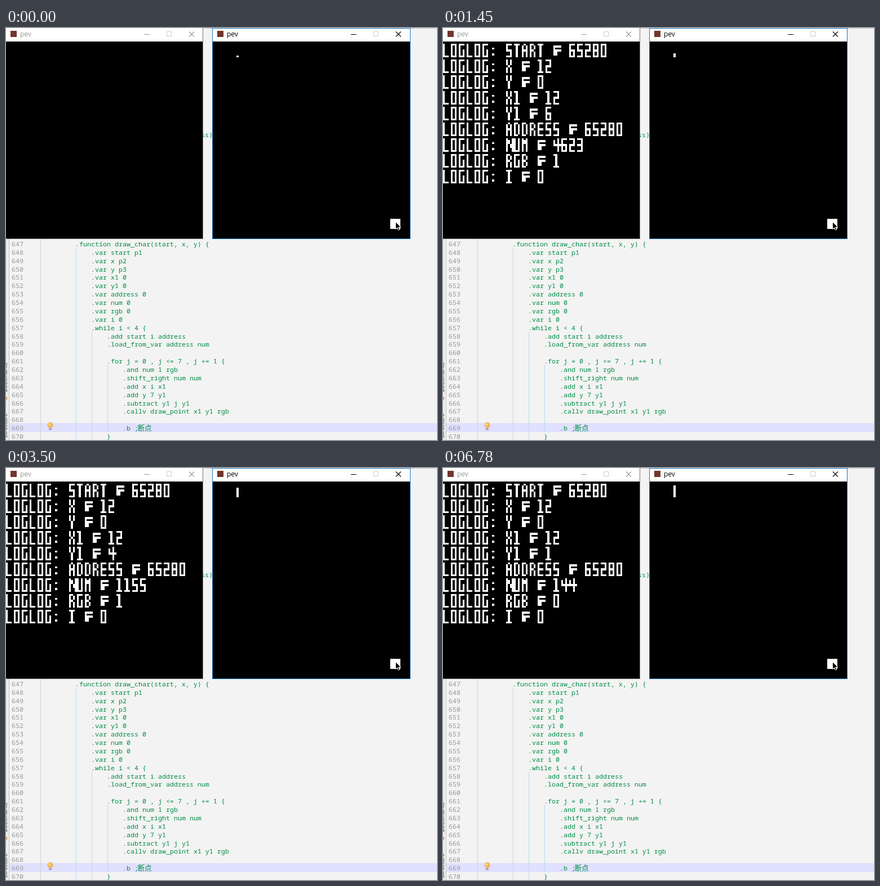
These frames come from a looping animation (765 by 732 pixels, 8000 ms). An HTML page with a canvas:

```html
<!DOCTYPE html>
<html lang="en">
<head>
<meta charset="utf-8">
<title>Debugger stepping through draw_char</title>
<style>
  html, body { margin: 0; width: 100%; height: 100%; overflow: hidden; background: #f3f3f3; }
  svg, canvas { position: absolute; left: 0; top: 0; display: block; }
  canvas { top: 24px; }
  .code text { font: 11.667px "Noto Sans Mono", "DejaVu Sans Mono", monospace; fill: #008c46; white-space: pre; }
  .code .number { fill: #999; }
  .code .cjk { font: 12.6px "Noto Sans CJK SC", "Noto Sans CJK", sans-serif; }
  .title { font: 12px "Open Sans", "Noto Sans", sans-serif; }
  .side { font: 10px "Open Sans", sans-serif; fill: #333; }
  .crisp { shape-rendering: crispEdges; }
</style>
</head>
<body>
<svg width="765" height="732" viewBox="0 0 765 732">
  <defs>
    <g id="buttons" fill="none">
      <path class="crisp" d="M245 11.5h10" stroke="currentColor"/>
      <path class="crisp" d="M285.5 6.5h8v8h-8z" stroke="#ccc"/>
      <path d="M325 6.5l9 9m0-9l-9 9" stroke="currentColor" stroke-width="1.1"/>
    </g>
  </defs>

  <rect width="765" height="732" fill="#f3f3f3"/>
  <rect width="765" height="1" fill="#c8c8c8"/>
  <g class="crisp">
    <rect y="375" width="5" height="357" fill="#ececec"/>
    <rect x="5" y="375" width="1" height="357" fill="#c4c4c4"/>
    <rect x="6" y="702" width="759" height="16" fill="#e0e0ff"/>
    <rect x="61" y="375" width="1" height="357" fill="#d4d4d4"/>
    <g fill="#bcd9ee">
      <rect x="124" y="391" width="1" height="341"/>
      <rect x="152" y="540" width="1" height="192"/>
      <rect x="180" y="599" width="1" height="119"/>
    </g>
  </g>
  <g class="side">
    <text transform="translate(2 647) rotate(-90)">Bookmarks</text>
    <text transform="translate(2 728) rotate(-90)">Structure</text>
  </g>
  <path d="M0 654l3 4-3 4z" fill="#e8a04a"/>
  <g class="code" id="code"></g>

  <circle cx="78.5" cy="705.5" r="5" fill="#f2b04a"/>
  <circle cx="77.5" cy="704.5" r="2.5" fill="#fad58c"/>
  <path class="crisp" d="M76 711.5h5m-5 2h5" stroke="#777"/>

  <g color="#999">
    <rect width="350" height="24" fill="#fff"/>
    <rect class="crisp" y="24" width="350" height="351" fill="#000"/>
    <path class="crisp" d="M349.5 0v374.5H0" fill="none" stroke="#777"/>
    <rect x="8" y="5" width="11" height="11" fill="#70362a"/>
    <text class="title" x="25" y="15" fill="#999">pev</text>
    <use href="#buttons"/>
  </g>

  <g color="#000">
    <rect x="366" width="352" height="24" fill="#fff"/>
    <rect class="crisp" x="366" y="24" width="352" height="351" fill="#000"/>
    <path class="crisp" d="M366.5 0v374.5h351V0M366 .5h352" fill="none" stroke="#1878c8"/>
    <rect x="375" y="5" width="11" height="11" fill="#70362a"/>
    <text class="title" x="392" y="15">pev</text>
    <use href="#buttons" x="367"/>
    <rect class="crisp" id="column" x="409" width="4" fill="#fff"/>
    <rect class="crisp" x="682" y="339" width="18" height="18" fill="#fff"/>
    <path d="M691.5 344.5v13l3-2.8 2 4.6 2.2-1-2-4.4h4.3z" fill="#000" stroke="#fff" stroke-width=".9"/>
  </g>
</svg>
<canvas id="screen" width="349" height="350"></canvas>

<script>
const CELL = 3.5, LOOP = 8000, COLUMN_BITS = 18495;
const LOG_TIMES = [120, 1450, 2810, 3500, 4780, 5430, 6780];
const POINT_TIMES = [0, 270, 1480, 2510, 3500, 4440];

const LINES = `0.function draw_char(start, x, y) {
1.var start p1
1.var x p2
1.var y p3
1.var x1 0
1.var y1 0
1.var address 0
1.var num 0
1.var rgb 0
1.var i 0
1.while i < 4 {
2.add start i address
2.load_from_var address num
0
2.for j = 0 , j <= 7 , j += 1 {
3.and num 1 rgb
3.shift_right num num
3.add x i x1
3.add y 7 y1
3.subtract y1 j y1
3.callv draw_point x1 y1 rgb
0
3.b ;
2}`.split("\n");

const code = document.getElementById("code");
function addText(x, y, content, className) {
  const node = document.createElementNS("http://www.w3.org/2000/svg", "text");
  node.setAttribute("x", x);
  node.setAttribute("y", y);
  if (className) node.setAttribute("class", className);
  node.textContent = content;
  code.append(node);
}
LINES.forEach((line, i) => {
  const y = 388 + i * 14.87;
  addText(10, y, 647 + i, "number");
  addText(123 + 28 * line[0], y, line.slice(1));
});
addText(233.5, 715, "断点", "cjk");
addText(346, 194, "ss)");

// Strokes of the block lettering: x, y, width, height in cells
const STROKES = {
  a: [0, 1, 3, 1], b: [2, 1, 1, 4], c: [2, 4, 1, 4], d: [0, 7, 3, 1],
  e: [0, 4, 1, 4], f: [0, 1, 1, 4], g: [0, 4, 3, 1],
  i: [1, 1, 1, 7], j: [1, 4, 1, 4], k: [0, 1, 1, 1], l: [3, 1, 1, 7],
  m: [1, 4, 1, 1], n: [1, 2, 1, 2], o: [2, 4, 1, 2], h: [0, 2, 1, 3],
  u: [2, 1, 1, 7], v: [0, 4, 4, 1], w: [0, 2, 4, 1], x: [0, 5, 2, 2],
  y: [1, 3, 1, 1], z: [1, 6, 1, 1], q: [0, 2, 1, 3],
  // capital letters erase a single cell
  P: [2, 1, 1, 1], Q: [0, 1, 1, 1], R: [2, 4, 1, 1], S: [2, 7, 1, 1], T: [0, 4, 1, 1]
};
const GLYPHS = {
  0: "abcdef", 1: "kid", 2: "abged", 3: "abgcd", 4: "huv", 5: "afgcd", 6: "afgecd",
  7: "abc", 8: "abcdefg", 9: "abcdfg",
  A: "abcefgPQ", B: "abcdefgPRS", D: "abcdefPS", E: "afged", G: "afedc", I: "aid",
  L: "fed", M: "bcefn", N: "feno" + "l", O: "abcdef", R: "abcefgPR", S: "afgcd",
  T: "ai", U: "bcdef", X: "bcefRTm", Y: "bfRTj", ":": "yz", "=": "wvqx"
};

const pen = document.getElementById("screen").getContext("2d");
const snapX = v => Math.ceil(v * CELL - 0.5);
const snapY = v => Math.round(v * CELL);

function drawText(text, row) {
  [...text].forEach((char, index) => {
    for (const key of GLYPHS[char] || "") {
      const [x, y, w, h] = STROKES[key];
      const left = snapX(index * 4 + x), top = snapY(row * 8 + y);
      pen.fillStyle = key < "a" ? "#000" : "#fff";
      pen.fillRect(left, top, snapX(index * 4 + x + w) - left, snapY(row * 8 + y + h) - top);
    }
  });
}

function drawLog(step) {
  pen.fillStyle = "#000";
  pen.fillRect(0, 0, 349, 350);
  if (!step) return;
  const values = {
    START: 65280, X: 12, Y: 0, X1: 12, Y1: 8 - step, ADDRESS: 65280,
    NUM: COLUMN_BITS >> step, RGB: COLUMN_BITS >> (step - 1) & 1, I: 0
  };
  Object.entries(values).forEach(([name, value], row) =>
    drawText(`LOGLOG: ${name} = ${value}`, row));
}

const column = document.getElementById("column");
function drawColumn(points) {
  const top = 24 + snapY(8 - points);
  column.setAttribute("y", top);
  column.setAttribute("height", 52 - top);
}

const passed = (times, t) => times.filter(time => time <= t).length;
const start = performance.now();
let shownStep = -1;
function frame() {
  const t = (performance.now() - start) % LOOP;
  const step = passed(LOG_TIMES, t);
  if (step !== shownStep) drawLog(shownStep = step);
  drawColumn(passed(POINT_TIMES, t));
  requestAnimationFrame(frame);
}
frame();
</script>
</body>
</html>
```
